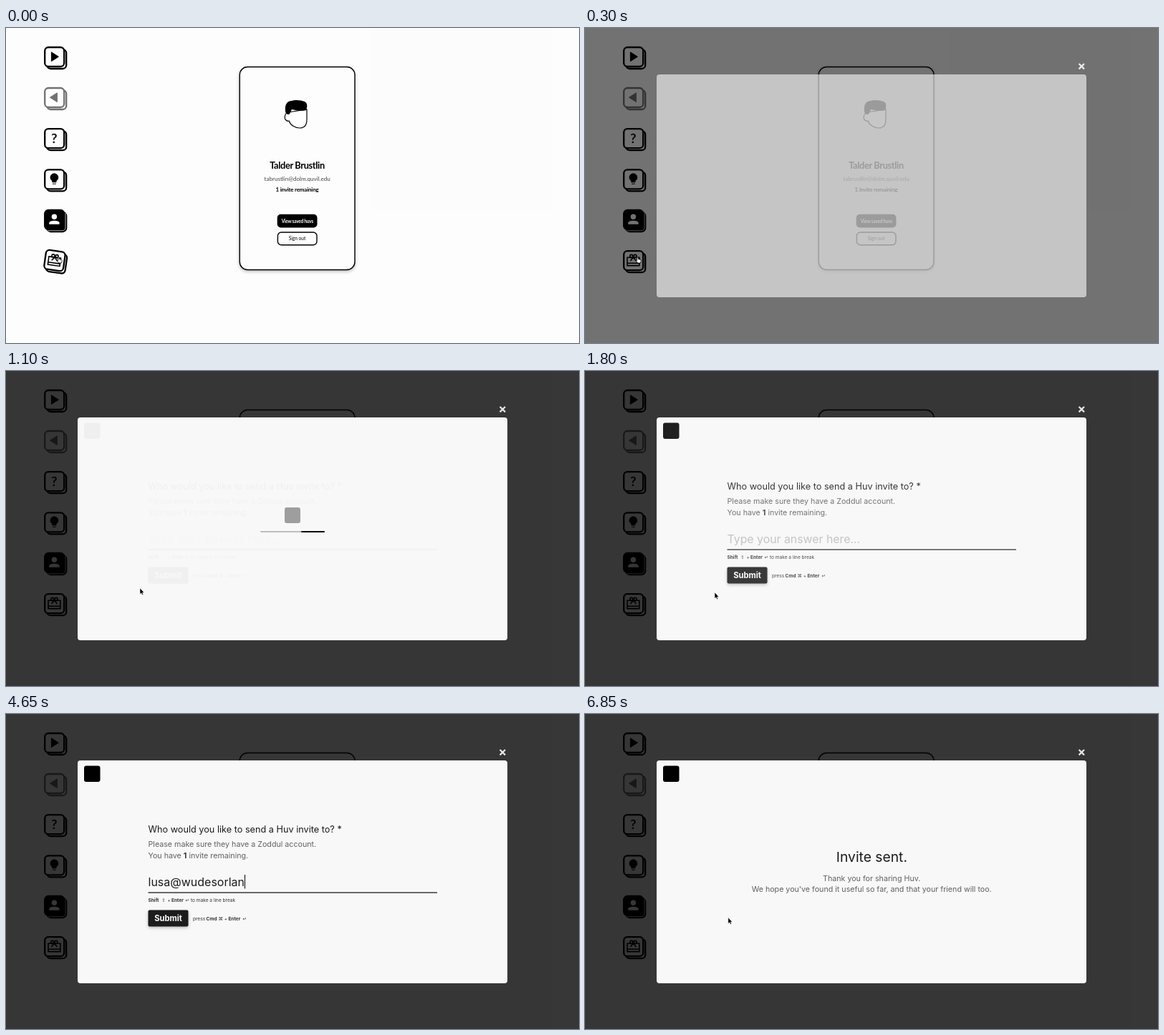
An HTML page that plays this animation: 800x441 px, repeating every 8000 ms.

```html
<!DOCTYPE html>
<html lang="en">
<head>
<meta charset="utf-8">
<title>Send an invite</title>
<style>
  html, body { margin: 0; width: 100%; height: 100%; overflow: hidden; background: #fdfdfd; }
  svg { display: block; width: 800px; height: 441px; font-optical-sizing: none; }
  .card text { font-family: Lato, "Open Sans", sans-serif; text-anchor: middle; }
  .modal text { font-family: Inter, Roboto, sans-serif; fill: #1b1b1b; }
  .modal .soft { fill: #606060; font-size: 10.68px; }
  .modal .hint { font-size: 6.55px; fill: #333; }
  .modal .key { font-family: "DejaVu Sans", sans-serif; }
  .mid { text-anchor: middle; }
  b, .bold { font-weight: 700; }
</style>
</head>
<body>
<svg viewBox="0 0 800 441">
  <defs>
    <filter id="shade" x="-20%" y="-20%" width="140%" height="150%">
      <feDropShadow dx="0" dy="2" stdDeviation="2" flood-opacity=".25"/>
    </filter>
    <g id="tile" stroke-width="2.3">
      <rect x="3" y="3" width="27" height="27" rx="5"/>
      <rect width="27" height="27" rx="5"/>
    </g>
  </defs>
  <rect width="800" height="441" fill="#fdfdfd"/>

  <g id="menu" fill="#fdfdfd" stroke="#000"></g>

  <g class="card">
    <rect x="326.3" y="54.5" width="160.7" height="284" rx="11" fill="#fdfdfd" stroke="#000" stroke-width="1.4" filter="url(#shade)"/>
    <path d="M394 118C389 119 388 127 391 129Q393 131 395 130C397 136 404 140 410 140C417 140 420 135 420 128V114Z" fill="#fff" stroke="#000" stroke-width="1.2"/>
    <path d="M390 116C389 108 392 102 399 102C404 100 412 101 417 103C421 105 421 110 419 115C412 117 404 115 399 114C397 117 397 120 395 121C392 121 390 119 390 116Z"/>
    <text class="bold" x="406.5" y="197.4" font-size="12.8" letter-spacing="-.35">Talder Brustlin</text>
    <text x="406.7" y="214" font-size="8.1" fill="#444">tabrustlin@dolm.quvil.edu</text>
    <text class="bold" x="406.5" y="228.6" font-size="8" letter-spacing="-.2">1 invite remaining</text>
    <rect x="378.7" y="260.7" width="55.8" height="18.8" rx="5"/>
    <text class="bold" x="406.7" y="272.8" font-size="6.6" letter-spacing="-.3" fill="#fff">View saved huvs</text>
    <rect x="379.4" y="286" width="54.6" height="17.8" rx="5" fill="none" stroke="#000" stroke-width="1.4"/>
    <text x="406.5" y="297.4" font-size="6.6">Sign out</text>
  </g>

  <g id="veil">
    <rect width="800" height="441" fill-opacity=".783"/>
    <path d="M689.6 50l7.4 7.4m0-7.4l-7.4 7.4" stroke="#e6e6e6" stroke-width="2.2"/>
  </g>

  <g class="modal" id="modal">
    <rect x="100" y="65" width="600" height="312" rx="4" fill="#f8f8f8"/>
    <g id="loader">
      <rect x="389" y="191" width="22" height="22" rx="3" fill-opacity=".36"/>
      <rect x="355" y="224" width="90" height="2" rx="1" fill="#bdbdbd"/>
      <rect id="bar" y="224" height="2" rx="1"/>
    </g>
    <rect id="logo" x="109" y="72.5" width="22.5" height="22.5" rx="3"/>
    <g id="form">
      <text x="198.5" y="165.6" font-size="12.7">Who would you like to send a Huv invite to? *</text>
      <text class="soft" x="198.5" y="186.4">Please make sure they have a Zoddul account.</text>
      <text class="soft" x="198.5" y="202">You have <tspan class="bold" fill="#333">1</tspan> invite remaining.</text>
      <text id="hold" x="198.5" y="240.8" font-size="15.85" style="fill:#bcbcbc">Type your answer here...</text>
      <text id="typed" x="198.5" y="240.8" font-size="16"></text>
      <rect id="caret" y="225" width="1" height="19.5"/>
      <rect x="198.5" y="249.4" width="403.5" height="1.3" fill="#1b1b1b"/>
      <g id="hints"></g>
      <rect x="198.5" y="274.5" width="56" height="23" rx="2" fill="#1a1a1a" filter="url(#shade)"/>
      <text class="mid bold" x="226.5" y="290.1" font-size="11.2" style="fill:#fff">Submit</text>
    </g>
    <g id="done" class="mid">
      <text x="400.4" y="207.4" font-size="19.25">Invite sent.</text>
      <text class="soft" x="400.2" y="233.6">Thank you for sharing Huv.</text>
      <text class="soft" x="400.2" y="249.2">We hope you've found it useful so far, and that your friend will too.</text>
    </g>
  </g>

  <g id="mouse">
    <path id="arrow" d="M0 0V8.4L1.9 6.8 3.2 9.6 4.6 9 3.4 6.2H5.9Z" stroke="#fff" stroke-width=".5"/>
    <path id="hand" d="M-.8 .8Q0-.4.8.8L1.2 3.4 4.6 4.4Q5.6 5 5 7L4.4 9H.6L-1.6 6Q-1.6 4.8-.2 5.4Z" fill="#fff" stroke="#000" stroke-width=".8"/>
  </g>
</svg>
<script>
const $ = id => document.getElementById(id);
const clamp = v => Math.max(0, Math.min(1, v));
const ramp = (t, from, to) => clamp((t - from) / (to - from));
const fade = (id, v) => $(id).setAttribute('opacity', v);

// Side buttons; glyphs are drawn around the tile's centre.
const line = 'fill="none" stroke-width="1.6"';
const tiles = [
  [27, '<path d="M-4-6.4V6.4L6 0Z" fill="#000" stroke-linejoin="round"/>'],
  [84, '<path d="M4-6.4V6.4L-6 0Z" fill="#000" stroke-linejoin="round"/>', .55],
  [141.2, '<text y="6.2" font-family="Lato, sans-serif" font-size="18" text-anchor="middle" fill="#000" stroke-width=".4">?</text>'],
  [198.4, '<path d="M-2.6 4.2V2.4A5.4 5.4 0 1 1 2.6 2.4V4.2ZM-2.4 6.6H2.4" fill="#000"/>'],
  [255, '<g fill="#fdfdfd" stroke="none"><circle cy="-4" r="3.7"/><path d="M-7.2 6.6V4.6C-7.2 .4 7.2 .4 7.2 4.6V6.6Z"/></g>'],
  [312.2, `<path d="M-8.4-4.2H8.4V7.2H-8.4ZM-8.4 3.8H8.4M0-4.4L-4 .6M0-4.4L4 .6" ${line}/>
    <g ${line}><circle cx="-2.6" cy="-6" r="2"/><circle cx="2.6" cy="-6" r="2"/></g>`]
];
$('menu').innerHTML = tiles.map(([y, glyph, alpha = 1], i) => `
  <g id="tile${i}" opacity="${alpha}" transform="translate(54.2 ${y})">
    <use href="#tile" ${i == 4 ? 'fill="#000" stroke="#000"' : ''}/>
    ${i == 4 ? '<path d="M4 28.8H24Q28.8 28.8 28.8 24V4" fill="none" stroke="#fdfdfd" stroke-width=".7"/>' : ''}
    <g transform="translate(13.2 13.2)">${glyph}</g>
  </g>`).join('');

const hint = (x, y, str, kind = '') => `<text class="hint ${kind}" x="${x}" y="${y}">${str}</text>`;
$('hints').innerHTML = [
  [198.5, 263.4, 'Shift', 'bold'], [217, 263.4, '⇧', 'key'], [225.4, 263.4, '+'],
  [231, 263.4, 'Enter', 'bold'], [250.4, 263.4, '↵', 'key'], [258, 263.4, 'to make a line break'],
  [261, 289.2, 'press'], [279.6, 289.2, 'Cmd', 'bold'], [296.6, 289.2, '⌘', 'key'], [304.8, 289.2, '+'],
  [310.4, 289.2, 'Enter', 'bold'], [330.6, 289.2, '↵', 'key']
].map(h => hint(...h)).join('');

const address = 'lusa@wudesorlan.com';
const keyTimes = [2450, 2550, 2650, 2800, 3100, 3350, 3500, 3700, 3750, 4000, 4150,
  4300, 4400, 4500, 4650, 4950, 5100, 5200, 5300];

// Pointer stops: time, x, y
const stops = [[0, 73, 320], [450, 73, 320], [850, 160, 311], [1000, 186, 305], [1100, 187, 304],
  [1700, 181, 310], [5850, 181, 310], [6250, 199.8, 285]];

function pointerAt(t) {
  const i = stops.findIndex(s => s[0] > t);
  if (i < 0) return stops[stops.length - 1].slice(1);
  const [a, b] = [stops[i - 1], stops[i]];
  const u = ramp(t, a[0], b[0]);
  const k = u * u * (3 - 2 * u);
  return [a[1] + (b[1] - a[1]) * k, a[2] + (b[2] - a[2]) * k];
}

function draw(t) {
  const tilt = 8 * (1 - ramp(t, 0, 200));
  $('tile5').setAttribute('transform', `translate(54.2 312.2) rotate(${tilt} 15 15)`);

  fade('veil', ramp(t, 0, 430));
  fade('modal', ramp(t, 50, 450));

  const appear = t < 1850 ? ramp(t, 1070, 1910) : 1;
  fade('loader', ramp(t, 600, 800) * (1 - ramp(t, 1100, 1300)));
  fade('logo', appear);
  fade('form', appear * (1 - ramp(t, 6400, 6600)));
  fade('done', ramp(t, 6700, 6850));

  // A dark stretch sweeps the loading track and is cut off at its ends.
  const head = 355 + 135 * (((t - 467) % 1000 + 1000) % 1000) / 1000 - 28.5;
  const left = Math.max(355, head), right = Math.min(445, head + 45);
  $('bar').setAttribute('x', left);
  $('bar').setAttribute('width', Math.max(0, right - left));

  const count = keyTimes.filter(k => k <= t).length;
  $('typed').textContent = address.slice(0, count);
  fade('hold', count ? 0 : 1);
  fade('caret', t >= 2250 && t < 5300 ? 1 : 0);
  $('caret').setAttribute('x', 198.5 + (count ? $('typed').getComputedTextLength() : 0));

  const [x, y] = pointerAt(t);
  $('mouse').setAttribute('transform', `translate(${x} ${y})`);
  fade('mouse', t < 2450 || t >= 5850 ? 1 : 0);
  fade('hand', t < 450 ? 1 : 0);
  fade('arrow', t < 450 ? 0 : 1);
}

function tick() {
  draw(performance.now() % 8000);
  requestAnimationFrame(tick);
}
tick();
</script>
</body>
</html>
```
